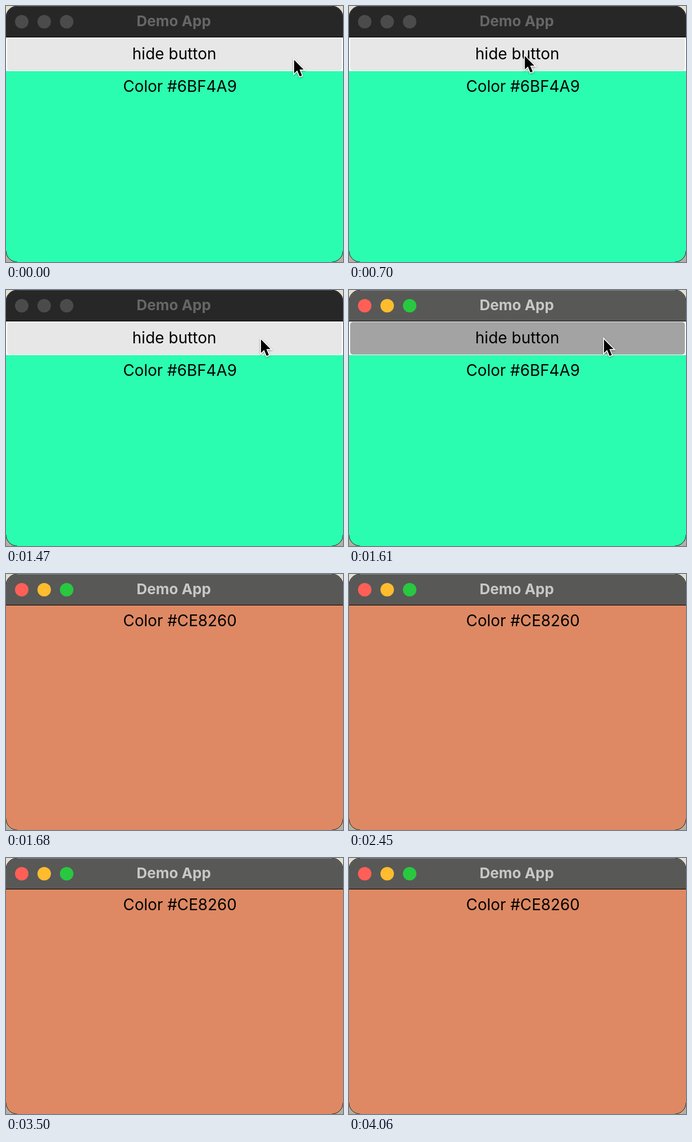
Write an HTML page that moves like this. It is 600x456 px and loops after 4130 ms.

```html
<!DOCTYPE html>
<html lang="en">
<head>
<meta charset="utf-8">
<title>Demo App</title>
<style>
  html, body { margin: 0; width: 100%; height: 100%; overflow: hidden; }
  body { background: linear-gradient(#e4decf 50%, #b6afa0 50%); }
  svg { display: block; width: 600px; height: 456px; }
  text { font: 28px Inter, "Liberation Sans", sans-serif; text-anchor: middle; }
  #label { font-size: 27.8px; }
  #title { font-size: 26px; font-weight: 700; fill: #666; }
  #bar { fill: #272727; }
  #edge { stroke: #4d4d4c; }
  #lights circle { fill: #4b4b4b; }
  #face { fill: #e7e7e7; }
  .active #title { fill: #c8c8c6; }
  .active #bar { fill: #585856; }
  .active #edge { stroke: #858583; }
  .active #lights circle { fill: var(--on); }
  .active #face { fill: #a3a3a3; }
  #cursor { filter: drop-shadow(0 1.5px 1.5px #0006); }
</style>
</head>
<body>
<svg id="stage" viewBox="0 0 600 456">
  <clipPath id="shape"><rect width="600" height="456" rx="20"/></clipPath>
  <g clip-path="url(#shape)">
    <rect id="body" y="56" width="600" height="400"/>
    <g id="button">
      <rect y="56" width="600" height="60" fill="#fff"/>
      <rect id="face" x="2" y="57" width="596" height="58" rx="5"/>
      <text x="299.7" y="95">hide button</text>
    </g>
    <text id="label" x="309.7"></text>
    <rect id="bar" width="600" height="55"/>
    <rect y="55" width="600" height="1"/>
    <text id="title" x="298.7" y="36">Demo App</text>
    <g id="lights">
      <circle cx="28" cy="28" r="12" style="--on:#ff5f57"/>
      <circle cx="68" cy="28" r="12" style="--on:#febc2e"/>
      <circle cx="108" cy="28" r="12" style="--on:#28c840"/>
    </g>
    <path id="edge" d="M.5 20A19.5 19.5 0 0 1 20 .5H580A19.5 19.5 0 0 1 599.5 20" fill="none"/>
  </g>
  <path d="M0 20A20 20 0 0 1 20 0M580 0A20 20 0 0 1 600 20M600 436A20 20 0 0 1 580 456M20 456A20 20 0 0 1 0 436"
        fill="none" stroke="#222"/>
  <path id="cursor" d="M2 4V28L7.5 22.8L12 33.5L16 31.8L11.6 21.3H19Z"
        stroke="#fff" stroke-width="3.2" paint-order="stroke"/>
</svg>
<script>
const LOOP = 4130, STEP = 70, PRESS = 1610, HIDE = 1680;
const $ = id => document.getElementById(id);
const smooth = p => p * p * (3 - 2 * p);
const glide = p => 1 - (1 - p) ** 1.5;

// Cursor moves: start, end, from, to, easing
const moves = [
  [0, 490, [511, 92], [311, 85], smooth],
  [840, 1260, [311, 85], [452, 84], smooth],
  [3010, 3220, [-25, 170], [419, 152], glide],
  [3220, 3500, [419, 152], [602, 135], smooth]
];

function cursorAt(t) {
  const [start, end, from, to, ease] = moves.findLast(m => t >= m[0]);
  const p = ease(Math.min(1, (t - start) / (end - start)));
  return from.map((v, i) => v + (to[i] - v) * p);
}

function draw(now) {
  const t = Math.floor(now % LOOP / STEP) * STEP;
  const hidden = t >= HIDE;
  $('stage').classList.toggle('active', t >= PRESS);
  $('button').style.display = hidden ? 'none' : '';
  $('body').setAttribute('fill', hidden ? '#de8963' : '#2bfdb0');
  $('label').setAttribute('y', hidden ? 92.7 : 152.7);
  $('label').textContent = hidden ? 'Color #CE8260' : 'Color #6BF4A9';
  $('cursor').style.display = hidden && (t < 3010 || t >= 3500) ? 'none' : '';
  $('cursor').setAttribute('transform', `translate(${cursorAt(t)})`);
}

const origin = performance.now();
function tick() {
  draw(performance.now() - origin);
  requestAnimationFrame(tick);
}
tick();
</script>
</body>
</html>
```
